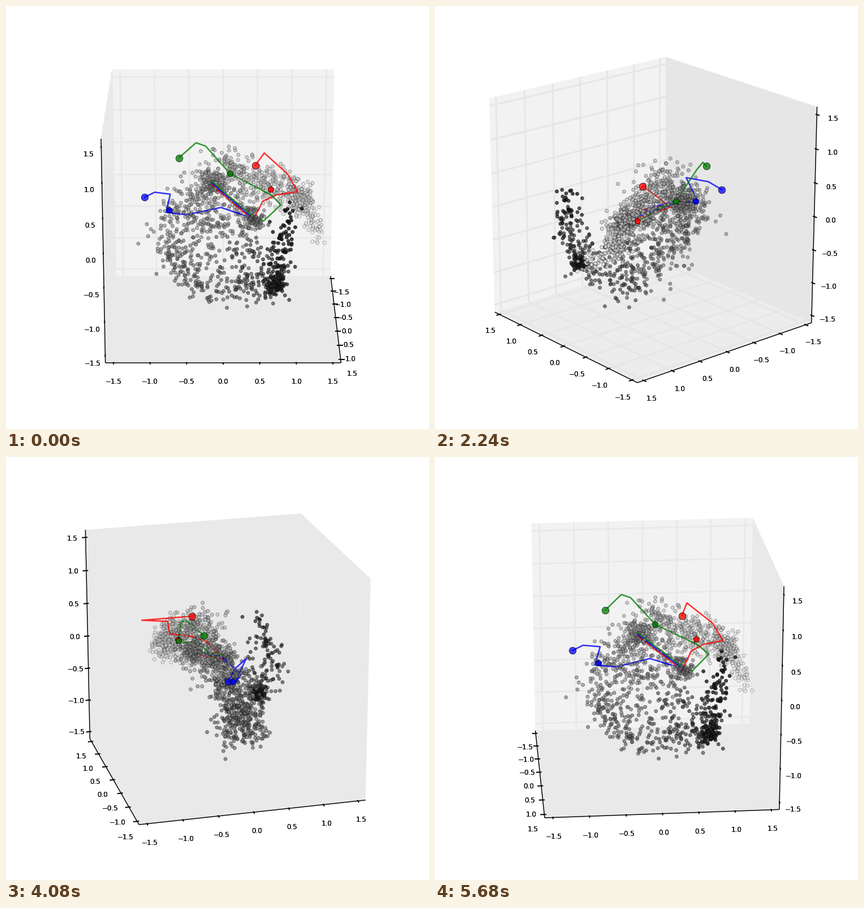
These frames come from a looping animation (748x748 px, 5760 ms). A matplotlib script:

```python
import numpy as np
import matplotlib.pyplot as plt
from matplotlib.animation import FuncAnimation
from matplotlib.collections import LineCollection
from matplotlib.patches import Polygon

SIZE, DPI = 748, 100
PX = 72 / DPI                       # one pixel in points
FRAMES, INTERVAL = 72, 80
ELEV = np.radians(20)
DIST, SCALE = 10, SIZE / 1.85       # eye distance, pixels per box side
CX, CY = SIZE * 0.95 / 1.85, SIZE * 0.9 / 1.85
TICKS = np.arange(-1.5, 1.6, 0.5)
UNIT = 0.31                         # one data unit in box sides
HALF, LABEL = 0.5, 0.55
OUT, INNER = 0.5 + 1 / 60, 0.5 - 1 / 120

# Places below are in hundredths of the box side
MEET, TAIL, FOOT = (3, 13, -2), (-15, -5, 8), (23, 23, -25)

# Key points of the strand that the cloud follows, from dark to light
STRAND = np.array([
    (19, 26, 15), (27, 29, 3), (32, 25, -13), FOOT, (4, 13, -35),
    (9, -4, -35), (7, -22, -25), (2, -26, -8), (-6, -20, 3), TAIL,
    (-8, 0, 22), (-15, 20, 10), (-18, 34, 3), (-21, 38, -4), (-3, 43, -15),
])

# Colour, turning points and resting place of each route
ROUTES = [
    ((1, 0, 0),
     [(-10.4, 14, 17.8), (-32, 18.4, 16.4), (-18, 28.5, 11.3),
      (-16, 33, 3.7), (-8, 23.5, 5), (-2.7, 17.4, 4)],
     (-15.2, 21, 5)),
    ((0, 0, 1),
     [(-7, -34.5, 4.3), (-3, -30, 8), (4, -23, 9.6), (-2, -25, -1),
      (3.8, -16, 0), (0, -1, 2)],
     (-2, -23.5, 0)),
    ((0, 0.5, 0),
     [(-13.6, -19.5, 20.3), (-19.6, -12, 25.3), (-20.7, -7.8, 23.4),
      (-19.4, 3, 11), (-12.5, 21.4, 3.2), (-4.5, 25.3, 1.6),
      (0, 17.7, -4.3)],
     (-19.4, 3, 11)),
]


def project(points, az):
    """Perspective view of box points: pixel positions and eye distance."""
    x, y, z = np.moveaxis(np.asarray(points, float), -1, 0)
    toward = x * np.cos(az) + y * np.sin(az)
    right = y * np.cos(az) - x * np.sin(az)
    up = z * np.cos(ELEV) - toward * np.sin(ELEV)
    depth = DIST - toward * np.cos(ELEV) - z * np.sin(ELEV)
    k = SCALE * DIST / depth
    return np.stack([CX + right * k, CY - up * k], axis=-1), depth


def make_cloud(count=1350, knot=90):
    """Points strewn along the strand, drawn in to MEET, and dense knots."""
    rng = np.random.default_rng(7)
    t = rng.beta(1.8, 1.4, count)
    keys = np.linspace(0, 1, len(STRAND))
    spots = np.column_stack([np.interp(t, keys, c) for c in STRAND.T])
    swell = np.sin(np.pi * t)[:, None]
    pull = 0.85 * swell * rng.random((count, 1)) ** 3
    spots += pull * (MEET - spots)
    spots += rng.normal(0, 1, (count, 3)) * (1.7 + 3 * swell)
    spots, greys = [spots], [0.04 + 0.9 * t ** 1.2]
    for center, grey in ((MEET, 0.45), (TAIL, 0.5), (FOOT, 0.12)):
        spots.append(rng.normal(center, 1.5 + 2 * grey, (knot, 3)))
        greys.append(np.full(knot, grey))
    return np.vstack(spots) / 100, np.concatenate(greys)


spots, greys = make_cloud()

fig = plt.figure(figsize=(SIZE / DPI, SIZE / DPI), dpi=DPI, facecolor="white")
ax = fig.add_axes([0, 0, 1, 1])
ax.set_xlim(0, SIZE)
ax.set_ylim(SIZE, 0)
ax.axis("off")

panes = [ax.add_patch(Polygon(np.zeros((4, 2)), lw=0, zorder=0))
         for _ in range(3)]


def line_set(width, zorder, color="black"):
    lines = LineCollection([], linewidths=width * PX, colors=color,
                           zorder=zorder)
    ax.add_collection(lines, autolim=False)
    return lines


grid = line_set(3, 1)
edges = line_set(1.5, 1.2)
marks = line_set(2, 1.3)


def dots(size, zorder, **style):
    return ax.scatter([0], [0], s=(size * PX) ** 2, zorder=zorder,
                      linewidths=0.85 * PX, **style)


far, near = dots(6, 2, c="grey"), dots(6, 4, c="grey")

routes = []
for i, (color, turns, rest) in enumerate(ROUTES):
    # The routes share their last leg, fanned out a little
    lift = np.array([0, 0, 0.8 * (i - 1)])
    path = np.vstack([turns, MEET + lift, TAIL + lift]) / 100
    line, = ax.plot([], [], color=color, alpha=0.8, lw=2.5 * PX, zorder=3)
    style = dict(color=[color], edgecolors="black")
    start = dots(12.5, 5, alpha=0.75, **style)
    stop = dots(11.5, 5, marker="p", alpha=0.9, **style)
    routes.append((path, np.array([rest]) / 100, line, start, stop))


def tick_text(value):
    return f"{value:.1f}".replace("-", "\u2212")


# Each label is laid down twice, which makes the digits heavier
labels = [[[ax.text(0, 0, tick_text(t), size=12 * PX, family="DejaVu Sans",
                    ha="center", va="baseline", zorder=1.4)
            for _ in range(2)] for t in TICKS] for _ in range(3)]


def shades(az):
    """Greys of the x, y, z panes and the grid; they blend near side views."""
    if abs(np.cos(az)) < 0.62:
        return [0.914] * 4
    if abs(np.sin(az)) < 0.3:
        return [0.95, 0.914, 0.914, 0.914]
    return [0.95, 0.90, 0.925, 0.90]


def pane_corners(axis, side):
    corners = np.empty((4, 3))
    u, v = [i for i in range(3) if i != axis]
    corners[:, axis] = side
    corners[:, u] = np.array([-1, 1, 1, -1]) * HALF
    corners[:, v] = np.array([-1, -1, 1, 1]) * HALF
    return corners


def draw_box(az):
    sx = 1 if np.cos(az) >= 0 else -1
    sy = 1 if np.sin(az) >= -1e-9 else -1
    back = np.array([-sx, -sy, -1]) * HALF
    *pane_greys, grid_grey = shades(az)

    for axis, (pane, grey) in enumerate(zip(panes, pane_greys)):
        pane.set_xy(project(pane_corners(axis, back[axis]), az)[0])
        pane.set_facecolor(str(grey))

    rules = []
    for axis in range(3):
        u, v = [i for i in range(3) if i != axis]
        for t in TICKS * UNIT:
            bend = np.tile(back, (3, 1))
            bend[:, axis] = t
            bend[0, u] *= -1
            bend[2, v] *= -1
            rules.append(project(bend, az)[0])
    grid.set_segments(rules)
    grid.set_color(str(grid_grey))

    # Signs of the edge that carries each axis, and its tick direction
    carriers = [((0, sy, -1), 1), ((sx, 0, -1), 0), ((sx, -sy, 0), 0)]
    spines, strokes = [], []
    for axis, (signs, across) in enumerate(carriers):
        signs = np.array(signs, float)
        spine = np.tile(signs * HALF, (2, 1))
        spine[:, axis] = -HALF, HALF
        spines.append(project(spine, az)[0])
        for t, pair in zip(TICKS * UNIT, labels[axis]):
            stroke = np.tile(signs * HALF, (2, 1))
            stroke[:, axis] = t
            stroke[:, across] = signs[across] * np.array([OUT, INNER])
            strokes.append(project(stroke, az)[0])
            spot = signs * LABEL
            spot[axis] = t
            x, y = project(spot, az)[0]
            for text in pair:
                text.set_position((x, y + 9.8))
    edges.set_segments(spines)
    marks.set_segments(strokes)


def draw_cloud(az):
    xy, depth = project(spots, az)
    # Points fade with distance; the darkest stay strong
    alpha = 0.5 - 0.35 * (depth - DIST) + 0.3 * (1 - greys) ** 3
    alpha = np.clip(alpha, 0.2, 0.95)
    faces = np.column_stack([greys, greys, greys, alpha])
    rims = np.column_stack([np.zeros((len(greys), 3)), 0.75 * alpha])
    order = np.argsort(-depth)
    split = np.count_nonzero(depth > DIST)
    for layer, part in ((far, order[:split]), (near, order[split:])):
        layer.set_offsets(xy[part])
        layer.set_facecolors(faces[part])
        layer.set_edgecolors(rims[part])


def draw(frame):
    az = np.radians(frame * 360 / FRAMES)
    draw_box(az)
    draw_cloud(az)
    for path, rest, line, start, stop in routes:
        xy = project(path, az)[0]
        line.set_data(xy[:, 0], xy[:, 1])
        start.set_offsets(xy[:1])
        stop.set_offsets(project(rest, az)[0])
    return []


anim = FuncAnimation(fig, draw, frames=FRAMES, interval=INTERVAL,
                     init_func=lambda: [], repeat=True, repeat_delay=0)
plt.show()
```
